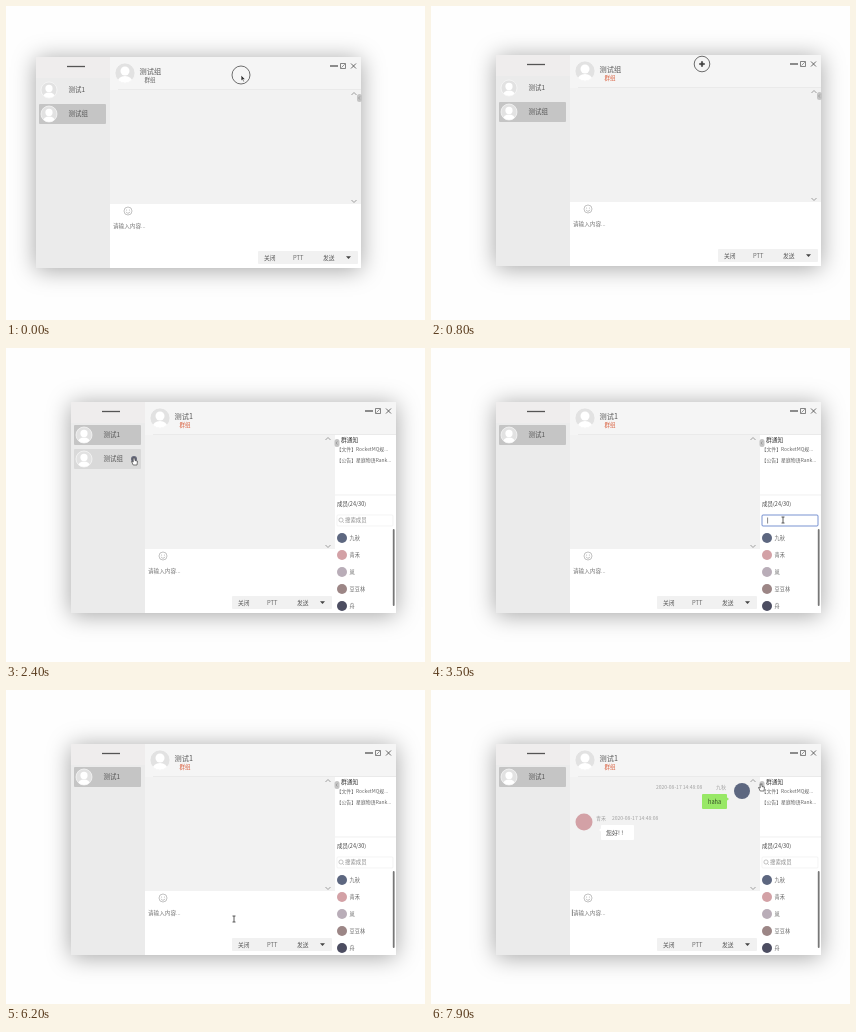
An HTML page with a canvas for the animation above (8 s loop, 419 px wide and 314 px high).

```html
<!DOCTYPE html>
<html lang="zh-CN">
<head>
<meta charset="utf-8">
<style>
  html, body { margin: 0; width: 100%; height: 100%; overflow: hidden; background: #fefefe; }
  canvas { display: block; width: 419px; height: 314px; }
</style>
</head>
<body>
<canvas id="stage"></canvas>
<script>
const WIDTH = 419, HEIGHT = 314, LOOP = 8000, STEP = 100;
const FONT = '"Noto Sans CJK SC", "Noto Sans CJK", "Noto Sans", sans-serif';
const canvas = document.getElementById('stage');
const ctx = canvas.getContext('2d');
const ratio = window.devicePixelRatio || 1;
canvas.width = WIDTH * ratio;
canvas.height = HEIGHT * ratio;

// Each row: time, x, y
const windowPath = [
  [0, 30, 51], [100, 31, 51], [300, 40, 46], [600, 58, 43],
  [800, 65, 49], [1000, 67, 55], [1200, 66, 56], [1500, 65, 54]
];
const pointerPath = [
  [0, 235, 69], [100, 237, 66], [300, 250, 54], [600, 271, 50], [800, 271, 58],
  [1000, 267, 66], [1200, 266, 65], [1500, 265, 63], [1800, 387, 96], [1900, 387, 96],
  [2200, 105, 88], [2400, 128, 112], [2700, 128, 112], [3300, 352, 172], [4800, 352, 172],
  [5400, 357, 174], [5700, 345, 190], [6200, 228, 229], [6800, 228, 229],
  [7100, 296, 255], [7300, 296, 255], [7900, 330, 96]
];
// Each row: time, value from then on
const searchSteps = [[0, ''], [4000, 'd'], [4100, 'do'], [4200, 'dou'], [4400, '..豆'], [5000, '..'], [5200, '']];
const draftSteps = [[0, ''], [6400, 'h'], [6500, 'ha'], [6700, 'hah'], [6800, 'haha'], [7200, '']];
const statusSteps = [[0, '#666'], [300, '#d9603f'], [900, '#666'], [1900, '#d9603f']];
const members = [
  ['九秋', '#5d6780'], ['青禾', '#d3a1a6'], ['岚', '#b9adb8'],
  ['豆豆林', '#9c8686'], ['舟', '#4c4d61']
];

function along(path, t) {
  const next = path.findIndex(row => row[0] > t);
  if (next < 0) return path[path.length - 1].slice(1);
  const [t0, x0, y0] = path[next - 1], [t1, x1, y1] = path[next];
  const k = (t - t0) / (t1 - t0);
  return [x0 + (x1 - x0) * k, y0 + (y1 - y0) * k];
}
const valueAt = (steps, t) => steps.filter(row => row[0] <= t).pop()[1];

function rect(x, y, w, h, fill, radius = 0, stroke) {
  ctx.beginPath();
  ctx.roundRect(x, y, w, h, radius);
  if (fill) { ctx.fillStyle = fill; ctx.fill(); }
  if (stroke) { ctx.strokeStyle = stroke; ctx.stroke(); }
}
function circle(x, y, r, fill, stroke) {
  ctx.beginPath();
  ctx.arc(x, y, r, 0, Math.PI * 2);
  if (fill) { ctx.fillStyle = fill; ctx.fill(); }
  if (stroke) { ctx.strokeStyle = stroke; ctx.stroke(); }
}
function line(points, color, width = 0.8) {
  ctx.beginPath();
  points.forEach(([x, y]) => ctx.lineTo(x, y));
  ctx.strokeStyle = color;
  ctx.lineWidth = width;
  ctx.stroke();
  ctx.lineWidth = 0.7;
}
function shape(points, fill, stroke) {
  ctx.beginPath();
  points.forEach(([x, y]) => ctx.lineTo(x, y));
  ctx.closePath();
  ctx.fillStyle = fill;
  ctx.fill();
  if (stroke) { ctx.strokeStyle = stroke; ctx.stroke(); }
}
function text(str, x, y, size, color = '#666', weight = 400) {
  ctx.font = `${weight} ${size}px ${FONT}`;
  ctx.fillStyle = color;
  ctx.fillText(str, x, y + size * 0.36);
  return ctx.measureText(str).width;
}
function blankAvatar(x, y, r) {
  ctx.save();
  circle(x, y, r, '#e2e2e2');
  ctx.clip();
  circle(x, y - r * 0.2, r * 0.45, '#fff');
  ctx.beginPath();
  ctx.ellipse(x, y + r * 0.9, r * 0.75, r * 0.6, 0, 0, Math.PI * 2);
  ctx.fill();
  ctx.restore();
  circle(x, y, r, null, '#f8f8f8');
}

function drawSidebar(t) {
  rect(0, 0, 74, 211, '#ebebeb');
  rect(0, 0, 74, 21, '#efeded');
  line([[31, 9.5], [49, 9.5]], '#555', 1.3);
  const firstActive = t >= 2200;
  const item = (label, y, fill) => {
    if (fill) rect(3, y, 67, 20, fill, 1);
    blankAvatar(13, y + 10, 8);
    text(label, 32.5, y + 10, 6.5, '#555');
  };
  item('测试1', 23, firstActive ? '#c5c5c5' : null);
  if (t < 2700) {
    item('测试组', 47, firstActive ? (t >= 2300 ? '#d9d9d9' : null) : '#c5c5c5');
    if (t >= 2300) circle(63, 57, 3, '#66697b');
  }
}

function drawHeader(t) {
  rect(74, 0, 251, 33, '#f5f5f5');
  blankAvatar(89, 16, 10);
  text(t < 2200 ? '测试组' : '测试1', 103.5, 14, 7.2, '#555');
  text('群组', 108.5, 23.5, 5.5, valueAt(statusSteps, t));
  line([[294, 9], [302, 9]], '#444', 1.2);
  rect(304.5, 6.5, 5, 5, null, 0, '#555');
  line([[305.5, 10.5], [308.8, 7.2]], '#555', 0.6);
  line([[315, 6.5], [320, 11.5]], '#444');
  line([[320, 6.5], [315, 11.5]], '#444');
  line([[82, 32.5], [325, 32.5]], '#e3e3e3', 0.6);
}

function drawMessages(t) {
  const stampColor = '#a2a2a2';
  if (t >= 7200) {
    text('2020-08-17 14:48:08', 160, 43, 5, stampColor);
    text(members[0][0], 220, 43, 5, stampColor);
    circle(246, 47, 8, members[0][1]);
    rect(206, 50, 25, 15, '#98e866', 1);
    shape([[230.5, 53], [233, 55], [230.5, 57]], '#98e866');
    text('haha', 212, 57.5, 5.6, '#344b28');
  }
  if (t >= 7500) {
    circle(88, 78, 8.5, members[1][1]);
    text(members[1][0], 100, 74.5, 5, stampColor);
    text('2020-08-17 14:48:08', 116, 74.5, 5, stampColor);
    rect(105, 81, 33, 15, '#fff', 1);
    shape([[105.5, 84], [103, 86], [105.5, 88]], '#fff');
    text('您好! !', 110, 88.5, 6, '#444');
  }
}

function drawChat(t, right) {
  rect(74, 33, right - 74, 114, '#f2f2f2');
  rect(74, 147, right - 74, 64, '#fff');
  const arrowX = right - 7;
  line([[arrowX - 2.5, 38], [arrowX, 35.5], [arrowX + 2.5, 38]], '#888');
  line([[arrowX - 2.5, 143], [arrowX, 145.5], [arrowX + 2.5, 143]], '#888');
  drawMessages(t);

  circle(92, 154, 4, null, '#aaa');
  circle(90.6, 153, 0.5, '#aaa');
  circle(93.4, 153, 0.5, '#aaa');
  ctx.beginPath();
  ctx.arc(92, 154.2, 2, 0.3, Math.PI - 0.3);
  ctx.strokeStyle = '#aaa';
  ctx.stroke();

  const draft = valueAt(draftSteps, t);
  const width = text(draft || '请输入内容...', 77, 169, 5.6, draft ? '#444' : '#777');
  if (t >= 6300 && (draft || t % 1000 >= 500)) {
    const caret = draft ? 77.5 + width : 76.4;
    line([[caret, 165.5], [caret, 172]], '#333', 0.6);
  }
  const bar = right - 103;
  rect(bar, 194, 100, 13, '#f1f1f1', 1);
  text('关闭', bar + 6, 200.5, 5.8, '#555');
  text('PTT', bar + 35, 200.5, 5.8, '#666');
  text('发送', bar + 65, 200.5, 5.8, '#555');
  shape([[bar + 88, 199.3], [bar + 93, 199.3], [bar + 90.5, 202]], '#444');
}

function drawHandle(x) {
  rect(x - 2, 37, 5, 8, '#c4c4c4', 2.5);
  line([[x + 0.8, 39.5], [x - 0.4, 41], [x + 0.8, 42.5]], '#888', 0.6);
}

function drawDrawer(t) {
  rect(264, 33, 61, 178, '#fff');
  text('群通知', 270, 37.5, 5.8, '#333', 500);
  text('【文件】RocketMQ规...', 265.5, 47.5, 4.9, '#666');
  text('【公告】星庭物语Rank...', 265.5, 58.5, 4.9, '#666');
  line([[264, 93], [325, 93]], '#e6e6e6', 0.6);
  text('成员(24/30)', 266, 102, 5.5, '#444');

  const query = valueAt(searchSteps, t);
  const focused = t >= 3500 && t < 5600;
  rect(266, 113, 56, 11, '#fff', 1, focused ? '#3f66bd' : '#f0f0f0');
  if (focused) {
    const width = text(query, 271, 118.5, 5.4, '#444');
    if (query || t % 1000 >= 500) line([[271.6 + width, 115.5], [271.6 + width, 121.5]], '#333', 0.6);
  }
  if (!query && !focused) {
    circle(270, 118, 2.1, null, '#aaa');
    line([[271.5, 119.5], [273, 121]], '#aaa', 0.6);
    text('搜索成员', 274, 118.5, 5.4, '#888');
  }
  const filtered = query.includes('豆');
  const shown = filtered ? members.filter(([name]) => name.includes('豆')) : members;
  shown.forEach(([name, color], i) => {
    const y = 136 + i * 17;
    circle(271, y, 5, color);
    text(name, 278.5, y, 5.2, '#666');
  });
  if (!filtered) rect(321.8, 127, 1.8, 77, '#777', 1);
}

function drawPointer(t) {
  const [x, y] = along(pointerPath, t);
  ctx.save();
  ctx.translate(x, y);
  ctx.lineWidth = 0.7;
  if (t < 1500) circle(0, 0, t < 200 ? 9 : 7.8, null, '#333');
  if (t >= 200 && t < 1500) {
    line([[-3, 0], [3, 0]], '#333', 1.2);
    line([[0, -3], [0, 3]], '#333', 1.2);
    circle(0, 0, 1.7, '#444');
  } else if ((t >= 6000 && t < 6900) || (t >= 3300 && t < 5300)) {
    line([[0, -3], [0, 3]], '#333');
    line([[-1.5, -3], [1.5, -3]], '#333');
    line([[-1.5, 3], [1.5, 3]], '#333');
  } else if ((t >= 1800 && t < 2700) || (t >= 7100 && t < 7300) || t >= 7800) {
    shape([[-0.8, -2], [0.8, -2], [1, 0.5], [3.5, 1.2], [3, 5], [-0.8, 5], [-2.5, 1.5], [-0.8, 2]], '#fff', '#444');
  } else {
    shape([[0, 0], [0, 6], [1.4, 4.8], [2.4, 7], [3.4, 6.5], [2.5, 4.4], [4.3, 4.2]], '#333', '#fff');
  }
  ctx.restore();
}

function draw(t) {
  ctx.setTransform(ratio, 0, 0, ratio, 0, 0);
  ctx.fillStyle = '#fefefe';
  ctx.fillRect(0, 0, WIDTH, HEIGHT);
  ctx.lineWidth = 0.7;
  const open = t >= 1900;
  ctx.save();
  ctx.translate(...along(windowPath, t));
  ctx.shadowColor = 'rgba(0, 0, 0, 0.36)';
  ctx.shadowBlur = 22 * ratio;
  ctx.shadowOffsetY = 1.5 * ratio;
  rect(0, 0, 325, 211, '#f5f5f5');
  ctx.shadowColor = 'transparent';
  drawSidebar(t);
  drawHeader(t);
  drawChat(t, open ? 264 : 325);
  if (open) drawDrawer(t);
  drawHandle(open ? 265.5 : 323);
  ctx.restore();
  drawPointer(t);
}

const start = performance.now();
function tick() {
  const elapsed = (performance.now() - start) % LOOP;
  draw(Math.floor(elapsed / STEP) * STEP);
  requestAnimationFrame(tick);
}
tick();
</script>
</body>
</html>
```
